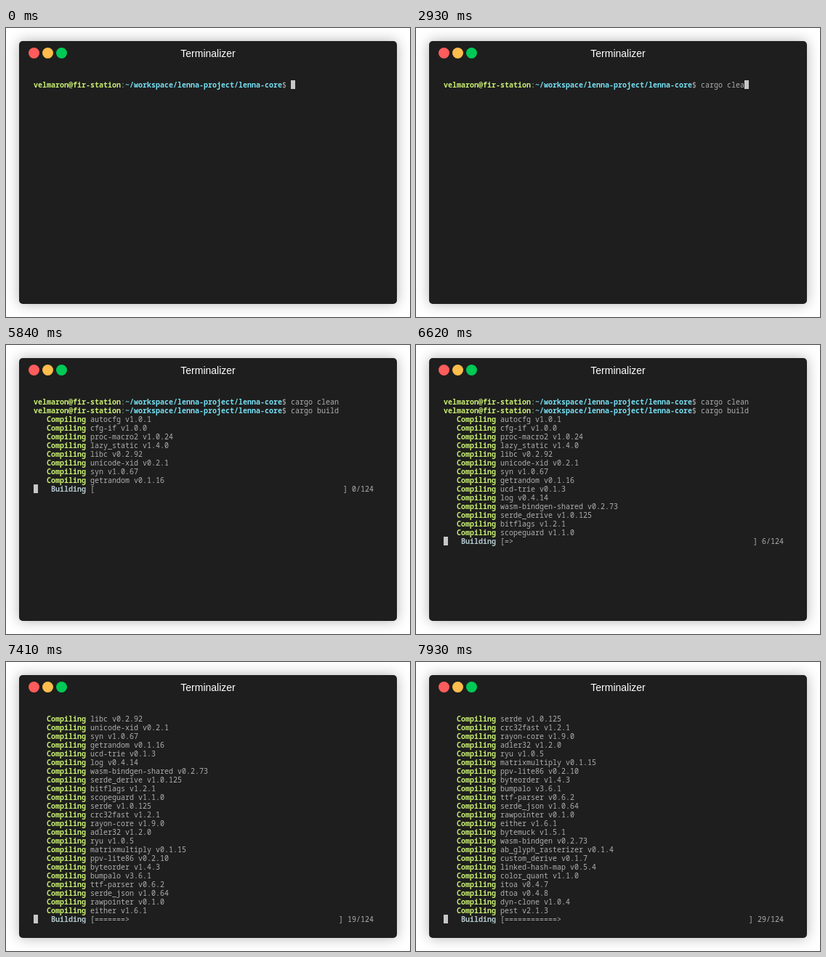
Animation, 556 px wide and 398 px high, one loop 8 s. Source, as an HTML page:

```html
<!DOCTYPE html>
<html lang="en">
<head>
<meta charset="utf-8">
<title>Terminal</title>
<style>
  html, body { margin: 0; width: 100%; height: 100%; overflow: hidden; background: #fff; }
  .window {
    position: absolute; left: 18px; top: 18px; width: 520px; height: 362px;
    border-radius: 5px; background: #1e1e1e; box-shadow: 0 0 18px rgba(0, 0, 0, .3);
  }
  .dot { position: absolute; top: 9px; width: 15px; height: 15px; border-radius: 50%; }
  .title {
    position: absolute; left: 0; right: 0; top: 9px; text-align: center; color: #fff;
    font: 14px/16px "Liberation Sans", Arial, sans-serif;
  }
  #screen {
    position: absolute; left: 20px; top: 54px; width: 480px; height: 288px; margin: 0;
    overflow: hidden; color: #afafaf; white-space: pre;
    font: 10px/12px "Noto Sans Mono", monospace; font-variant-ligatures: none;
  }
  #screen div { height: 12px; }
  #cursor { position: absolute; width: 6px; height: 12px; background: #c7c7c7; }
  b { font-weight: 700; }
  .green { color: #c8ed71; }
  .blue { color: #75dff2; }
  .cyan { color: #b1c6ca; }
</style>
</head>
<body>
<div class="window">
  <i class="dot" style="left:13px;background:#ff5c5c"></i>
  <i class="dot" style="left:32px;background:#ffbd4c"></i>
  <i class="dot" style="left:51px;background:#00ca56"></i>
  <div class="title">Terminalizer</div>
  <div id="screen"></div>
</div>
<script>
const LOOP = 8000, ROWS = 24, COLS = 78, TOTAL = 124, JOBS = 8;
const PROMPT_COLS = 59;
const screen = document.getElementById('screen');

const crates = `autocfg v1.0.1,cfg-if v1.0.0,proc-macro2 v1.0.24,lazy_static v1.4.0,libc v0.2.92,
unicode-xid v0.2.1,syn v1.0.67,getrandom v0.1.16,ucd-trie v0.1.3,log v0.4.14,
wasm-bindgen-shared v0.2.73,serde_derive v1.0.125,bitflags v1.2.1,scopeguard v1.1.0,
serde v1.0.125,crc32fast v1.2.1,rayon-core v1.9.0,adler32 v1.2.0,ryu v1.0.5,
matrixmultiply v0.1.15,ppv-lite86 v0.2.10,byteorder v1.4.3,bumpalo v3.6.1,ttf-parser v0.6.2,
serde_json v1.0.64,rawpointer v0.1.0,either v1.6.1,bytemuck v1.5.1,wasm-bindgen v0.2.73,
ab_glyph_rasterizer v0.1.4,custom_derive v0.1.7,linked-hash-map v0.5.4,color_quant v1.1.0,
itoa v0.4.7,dtoa v0.4.8,dyn-clone v1.0.4,pest v2.1.3`.split(/,\s*/);

// Key press times of each command, then its Enter.
const cleanKeys = [500, 740, 860, 1200, 1330, 1570, 2570, 2680, 2790, 2930, 3150];
const cleanEnter = 3450, nextPrompt = 3550;
const buildKeys = [4280, 4490, 4590, 4820, 4900, 5040, 5180, 5250, 5330, 5400, 5560];
const buildEnter = 5730, buildStart = 5840;

// Times at which one more crate is done; a repeated time means two at once.
const doneTimes = [
  5920, 5990, 6060,
  6430, 6510, 6590, 6660, 6660, 6740, 6810, 6890, 6890, 6970, 7040, 7120, 7160,
  7260, 7310, 7360, 7420, 7420, 7470, 7520, 7570, 7630, 7730, 7800, 7860, 7930
];

const passed = (times, t) => times.filter(x => x <= t).length;
const bold = (color, text) => `<b class="${color}">${text}</b>`;
const prompt = cmd => bold('green', 'velmaron@fir-station') + ':' +
  bold('blue', '~/workspace/lenna-project/lenna-core') + '$ ' + cmd;

function progress(done) {
  const tail = `] ${done}/${TOTAL}`;
  const width = COLS - 14 - tail.length;
  const filled = Math.floor(done / TOTAL * width);
  const bar = filled ? '='.repeat(filled - 1) + '&gt;' + ' '.repeat(width - filled) : ' '.repeat(width);
  return '    ' + bold('cyan', 'Building') + ' [' + bar + tail;
}

function content(t) {
  const typedClean = passed(cleanKeys, t);
  const lines = [prompt('cargo clean'.slice(0, typedClean))];
  let col = PROMPT_COLS + typedClean;
  if (t >= cleanEnter) { lines.push(''); col = 0; }
  if (t >= nextPrompt) {
    const typed = passed(buildKeys, t);
    lines[1] = prompt('cargo build'.slice(0, typed));
    col = PROMPT_COLS + typed;
  }
  if (t >= buildEnter) { lines.push(''); col = 0; }
  if (t >= buildStart) {
    const done = passed(doneTimes, t);
    lines.pop();
    for (const crate of crates.slice(0, JOBS + done))
      lines.push('   ' + bold('green', 'Compiling') + ' ' + crate);
    lines.push(progress(done));
  }
  return { lines: lines.slice(-ROWS), col };
}

let shown = '';
function draw() {
  const { lines, col } = content(performance.now() % LOOP);
  const html = lines.map(l => `<div>${l}</div>`).join('') +
    `<i id="cursor" style="left:${col * 6}px;top:${(lines.length - 1) * 12}px"></i>`;
  if (html !== shown) screen.innerHTML = shown = html;
  requestAnimationFrame(draw);
}
draw();
</script>
</body>
</html>
```
